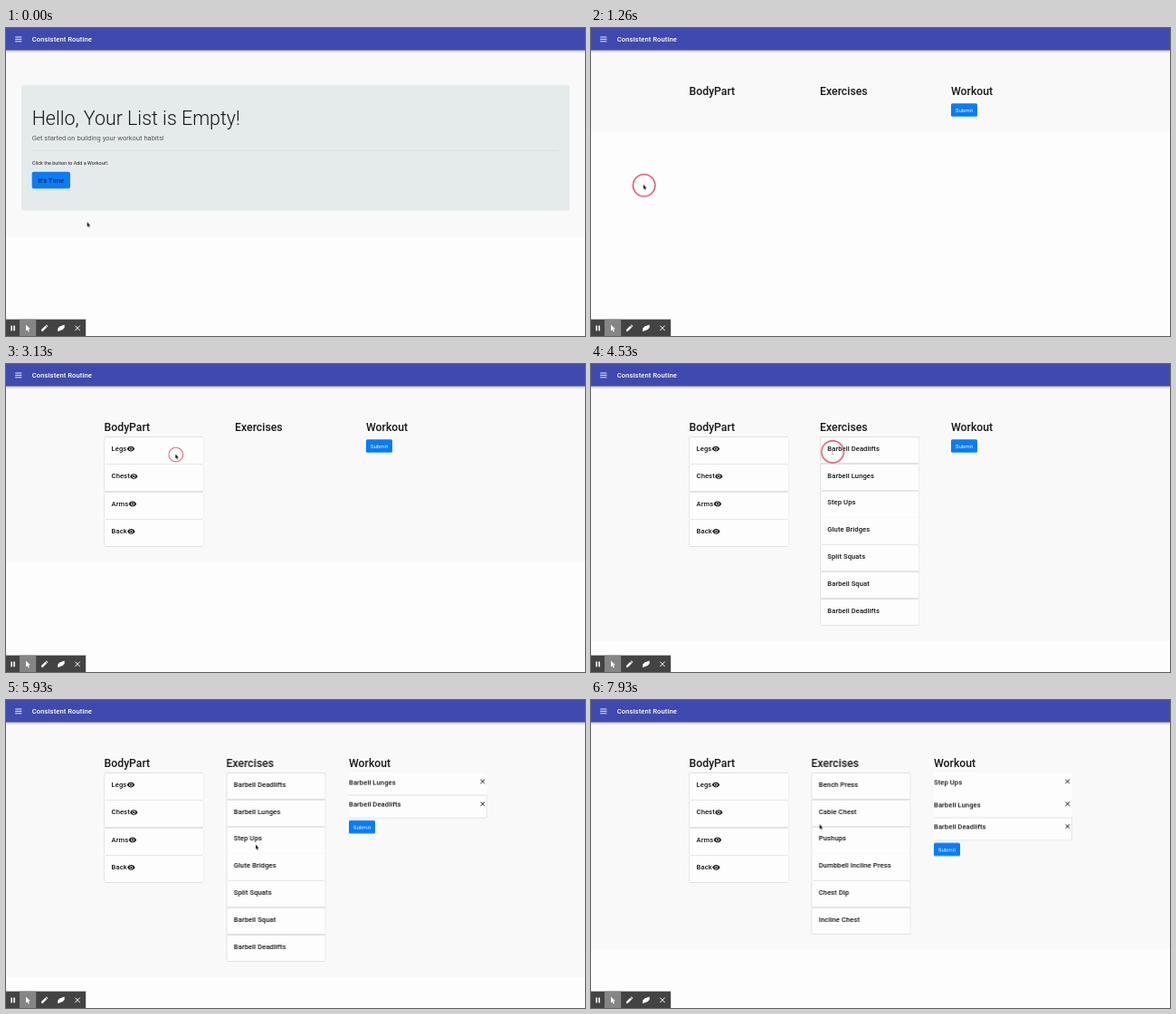
These frames come from a looping animation (640x340 px, 8 s). An HTML page:

```html
<!DOCTYPE html>
<html lang="en">
<head>
<meta charset="utf-8">
<title>Workout planner</title>
<style>
html, body { margin: 0; width: 100%; height: 100%; overflow: hidden; background: #fdfdfd; }
svg { display: block; width: 640px; height: 340px; font-family: Roboto, sans-serif; fill: #151719; }
.title, .item { font-size: 7.66px; font-weight: 500; letter-spacing: .0075em; }
.head { font-size: 12.26px; font-weight: 500; }
.white { fill: #fff; }
.blue { fill: #087cfb; }
.card { fill: #fdfdfd; filter: drop-shadow(0 .6px .5px rgba(0, 0, 0, .42)); }
.bar { fill: #3f4aae; filter: drop-shadow(0 1px 1.3px rgba(0, 0, 0, .35)); }
.cross { fill: none; stroke: #151719; stroke-width: 1; }

/* hard switches */
.page, .home, .app, .hover, .parts, .legs, .chest, .exercises, .workout, .list, .row, .arrow, .beam {
  animation: 8s step-end infinite;
}
.page { animation-name: page; }
.home { animation-name: home; }
.app { animation-name: app; }
.hover { animation-name: hover; }
.parts { animation-name: parts; }
.legs { animation-name: legs; }
.chest { animation-name: chest; }
.exercises { animation-name: exercises; }
.workout { animation-name: workout; }
.list { animation-name: list; }
.row0 { animation-name: third; }
.row1 { animation-name: second; }
.row2 { animation-name: first; }
.arrow { animation-name: arrow; }
.beam { animation-name: beam; }
@keyframes page {
  0% { transform: translateY(-75px); }
  15.7% { transform: translateY(-191px); }
  16.6% { transform: translateY(-87px); }
  39.95% { transform: none; }
  94.1%, 100% { transform: translateY(-30px); }
}
@keyframes home { 0% { opacity: 1; } 15.7%, 100% { opacity: 0; } }
@keyframes app { 0% { opacity: 0; } 15.7%, 100% { opacity: 1; } }
@keyframes hover { 0% { opacity: 0; } 8.7%, 100% { opacity: 1; } }
@keyframes parts { 0% { opacity: 0; } 16.6%, 100% { opacity: 1; } }
@keyframes legs { 0% { opacity: 0; } 39.95% { opacity: 1; } 94.1%, 100% { opacity: 0; } }
@keyframes chest { 0% { opacity: 0; } 94.1%, 100% { opacity: 1; } }
@keyframes exercises { 0% { transform: none; } 59.1%, 100% { transform: translateX(-9.6px); } }
@keyframes workout { 0% { transform: none; } 59.1%, 100% { transform: translateX(-19px); } }
@keyframes list {
  0% { transform: translateY(-74.4px); }
  59.1% { transform: translateY(-49.6px); }
  68.2% { transform: translateY(-24.8px); }
  77.4%, 100% { transform: none; }
}
@keyframes first { 0% { opacity: 0; } 59.1%, 100% { opacity: 1; } }
@keyframes second { 0% { opacity: 0; } 68.2%, 100% { opacity: 1; } }
@keyframes third { 0% { opacity: 0; } 77.4%, 100% { opacity: 1; } }
@keyframes arrow { 0% { opacity: 1; } 50% { opacity: 0; } 60.8%, 100% { opacity: 1; } }
@keyframes beam { 0% { opacity: 0; } 50% { opacity: 1; } 60.8%, 100% { opacity: 0; } }

/* pointer path and click ring */
.pointer { animation: move 8s ease-in-out infinite; }
.ring { fill: none; stroke: #d8526a; stroke-width: 1.5; animation: click 8s linear infinite; }
@keyframes move {
  0%, .75% { transform: translate(89.6px, 214.2px); }
  10.75%, 26.6% { transform: translate(57.9px, 172.8px); }
  34.1%, 45.75% { transform: translate(187.3px, 99.4px); }
  50.75%, 60% { transform: translate(266.4px, 96px); }
  66.1%, 68.75% { transform: translate(269px, 128px); }
  73.75%, 82.5% { transform: translate(276px, 159.6px); }
  90.75%, 95% { transform: translate(190px, 127px); }
  99.05%, 100% { transform: translate(252.6px, 137.3px); }
}
@keyframes click {
  0%, 13.2% { transform: scale(0); }
  13.25%, 16.6% { transform: scale(1); }
  17.4%, 37.4% { transform: scale(0); }
  37.45%, 38.3% { transform: scale(1); }
  40.6%, 56.55% { transform: scale(0); }
  56.6%, 58.4% { transform: scale(1); }
  59.2%, 66.6% { transform: scale(0); }
  66.65%, 68.2% { transform: scale(1); }
  69.2%, 75% { transform: scale(0); }
  75.05%, 77% { transform: scale(1); }
  78%, 92.5% { transform: scale(0); }
  92.55%, 94% { transform: scale(1); }
  95%, 100% { transform: scale(0); }
}
</style>
</head>
<body>
<svg viewBox="0 0 640 340">
  <defs>
    <path id="eye" transform="scale(.383) translate(-12 -12)" d="M12 4.5C7 4.5 2.73 7.61 1 12c1.73 4.39 6 7.5 11 7.5s9.27-3.11 11-7.5c-1.73-4.39-6-7.5-11-7.5zM12 17c-2.76 0-5-2.24-5-5s2.24-5 5-5 5 2.24 5 5-2.24 5-5 5zm0-8c-1.66 0-3 1.34-3 3s1.34 3 3 3 3-1.34 3-3-1.34-3-3-3z"/>
  </defs>
  <rect class="page" y="-20" width="640" height="325.5" fill="#f9f9f9"/>

  <g class="home">
    <rect x="17" y="62.7" width="606" height="138.8" rx="2" fill="#e5eaea"/>
    <text x="28.7" y="107.4" font-size="21.4" font-weight="300">Hello, Your List is Empty!</text>
    <text x="28.8" y="123.8" font-size="7.66" font-weight="300">Get started on building your workout habits!</text>
    <path d="M28.7 135.4H611" stroke="#d2d7d7" stroke-width=".6"/>
    <text x="28.9" y="150.9" font-size="5.36" letter-spacing=".055">Click the button to Add a Workout!.</text>
    <rect class="blue" x="28.7" y="158.7" width="42.2" height="18.6" rx="1.8"/>
    <text x="49.8" y="171" font-size="7.66" text-anchor="middle">It's Time</text>
    <g class="hover">
      <rect x="28.7" y="158.7" width="42.2" height="18.6" rx="1.8" fill="#0867cb"/>
      <text class="white" x="49.8" y="171" font-size="7.66" text-anchor="middle">It's Time</text>
    </g>
  </g>

  <g class="app">
    <text class="head" x="108.5" y="74.3">BodyPart</text>
    <g class="parts" id="parts"></g>
    <g class="exercises">
      <text class="head" x="253.1" y="74.3">Exercises</text>
      <g class="legs" id="legs"></g>
      <g class="chest" id="chest"></g>
    </g>
    <g class="workout">
      <text class="head" x="398" y="74.3">Workout</text>
      <g class="list">
        <g id="list"></g>
        <rect class="blue" x="398" y="157.7" width="29" height="14.4" rx="1.5"/>
        <text class="white" x="412.5" y="167" font-size="6.13" text-anchor="middle">Submit</text>
      </g>
    </g>
  </g>

  <rect class="bar" x="-5" y="-5" width="650" height="29.4"/>
  <path d="M10.2 10h7.2M10.2 12.4h7.2M10.2 14.8h7.2" stroke="#fff" stroke-width=".9"/>
  <text class="title white" x="28.8" y="15">Consistent Routine</text>

  <rect y="321.6" width="88.2" height="18.4" fill="#434343"/>
  <rect x="15" y="321.6" width="18.2" height="18.4" fill="#858585"/>
  <g class="white">
    <path d="M5.4 328.4h1.6v5.8H5.4zM8.3 328.4h1.6v5.8H8.3z"/>
    <path d="M22 327.4v7l1.6-1.5 1.1 2.5 1.1-.5-1.1-2.4h2.2z"/>
    <path d="M39 334.8v-1.7l4.4-4.4 1.7 1.7-4.4 4.4zM43.9 328.2l.8-.8 1.7 1.7-.8.8z"/>
    <path d="M57.2 335v-3.2l2-2.2 5.4-2.2v3.4l-2 2.2z"/>
    <path d="M76.3 328.6l5.4 5.4M81.7 328.6l-5.4 5.4" stroke="#fff" stroke-width="1"/>
  </g>

  <g class="pointer">
    <circle class="ring" cx=".7" cy=".9" r="12.2"/>
    <path class="arrow" d="M0 0v5l1.15-1 .8 1.9.9-.4-.8-1.8h1.5z" fill="#111" stroke="#fff" stroke-width=".5" paint-order="stroke"/>
    <path class="beam" d="M-.5-2.2h2M.5-2.2v6.2M-.5 4h2" fill="none" stroke="#8a8a8a" stroke-width=".6"/>
  </g>
</svg>
<script>
const fill = (id, items, draw) => {
  document.getElementById(id).innerHTML = items.map(draw).join('');
};
const card = (x, y, h, name) =>
  `<rect class="card" x="${x}" y="${y}" width="109.4" height="${h}" rx="1.3"/>
   <text class="item" x="${x + 7.9}" y="${y + 15.1}">${name}</text>`;
const exercise = (name, i) => card(253.4, 80.6 + i * 29.8, 28.9, name);

fill('parts', [['Legs', 138], ['Chest', 141.3], ['Arms', 139.9], ['Back', 138.4]], ([name, eye], i) => {
  const y = 80.6 + i * 30.4;
  return card(108.7, y, 29.6, name) + `<use href="#eye" x="${eye}" y="${y + 13}"/>`;
});
fill('legs', ['Barbell Deadlifts', 'Barbell Lunges', 'Step Ups', 'Glute Bridges',
  'Split Squats', 'Barbell Squat', 'Barbell Deadlifts'], exercise);
fill('chest', ['Bench Press', 'Cable Chest', 'Pushups', 'Dumbbell Incline Press',
  'Chest Dip', 'Incline Chest'], exercise);
fill('list', ['Step Ups', 'Barbell Lunges', 'Barbell Deadlifts'], (name, i) => {
  const y = 80.3 + i * 24.8;
  return `<g class="row row${i}">
    <rect class="${i < 2 ? '' : 'card'}" x="398" y="${y}" width="152.3" height="24.8" fill="#fdfdfd"/>
    <text class="item" x="398" y="${y + 12.9}">${name}</text>
    <path class="cross" d="M543.5 ${y + 7.3}l4.6 4.6m0-4.6l-4.6 4.6"/></g>`;
});
</script>
</body>
</html>
```
